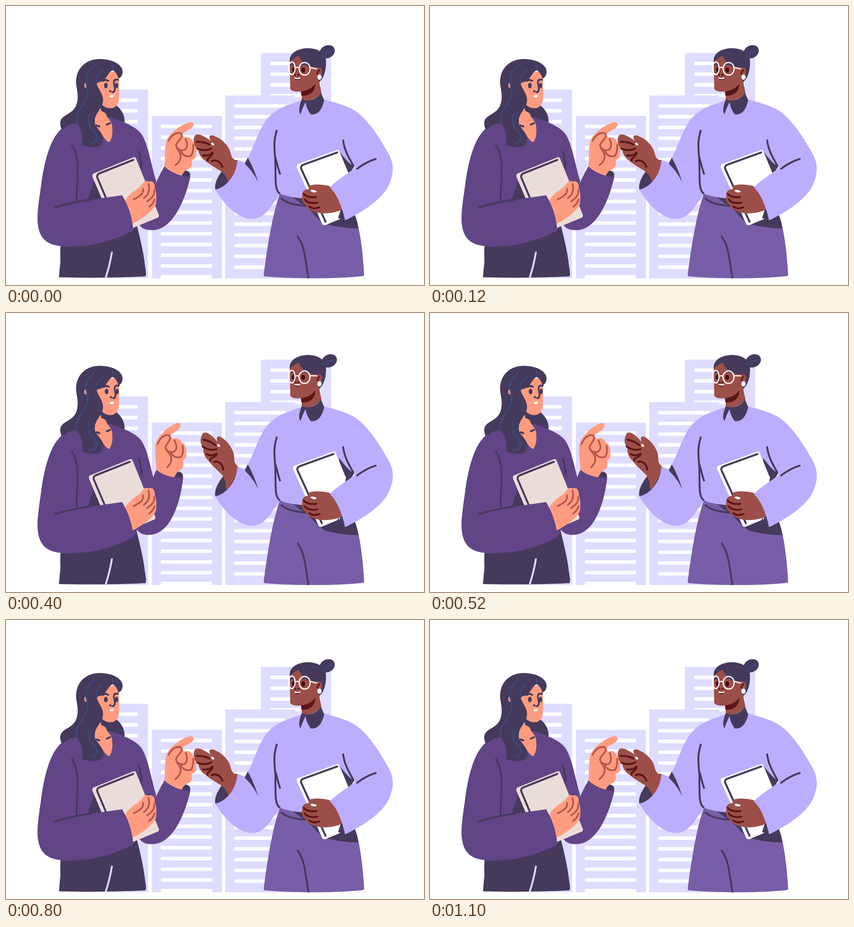
Write an HTML page with a canvas that moves like this. It is 900 px wide and 600 px high and loops after 1.3 s.

```html
<!DOCTYPE html>
<html lang="en">
<head>
<meta charset="utf-8">
<title>Conversation</title>
<style>
html, body { margin: 0; width: 100%; height: 100%; overflow: hidden; background: #fff; }
canvas { display: block; width: 900px; height: 600px; }
</style>
</head>
<body>
<canvas id="stage" width="900" height="600"></canvas>
<script>
const ctx = document.getElementById('stage').getContext('2d');
const LOOP = 1300, STEP = 200;
const DARK = '#453a5c', BLUE = '#3f4673', PALE = '#dedcff', WHITE = '#fff';
const PLUM = '#614587', PEACH = '#ff9c80', RUST = '#b5534a', PAPER = '#eaddd9';
const LILAC = '#bcadff', SKIRT = '#785ea8', BROWN = '#9b4f48', MAROON = '#5c1515';
const EYE = '#3f0c0c';

// Offsets and angles for the three poses
const POSES = [
  { lift: 0, arm: 0, hand: 0, padL: [0, 0], padR: [0, 0], face: [0, 0], specs: [0, 0], bun: [0, 0] },
  { lift: -.6, arm: -3.5, hand: 5.8, padL: [-3, -4.4], padR: [-2.5, -3.4], face: [.8, -1], specs: [0, 1.9], bun: [2, 2] },
  { lift: -.6, arm: -6.4, hand: 12.5, padL: [-7.5, -10.4], padR: [-8, -11.2], face: [1.6, -1.6], specs: [-.3, 3.6], bun: [4.6, 5] }
];

const cache = {};
const path = d => cache[d] || (cache[d] = new Path2D(d));

function fill(color, d) {
  ctx.fillStyle = color;
  ctx.fill(path(d));
}

function line(color, width, d) {
  ctx.strokeStyle = color;
  ctx.lineWidth = width;
  ctx.stroke(path(d));
}

function oval(color, x, y, rx, ry, turn = 0, stroke = 0) {
  ctx.beginPath();
  ctx.ellipse(x, y, rx, ry, turn, 0, Math.PI * 2);
  if (stroke) {
    ctx.strokeStyle = color;
    ctx.lineWidth = stroke;
    ctx.stroke();
  } else {
    ctx.fillStyle = color;
    ctx.fill();
  }
}

function shifted([x, y], draw) {
  ctx.save();
  ctx.translate(x, y);
  draw();
  ctx.restore();
}

function turned(deg, x, y, draw) {
  ctx.save();
  ctx.translate(x, y);
  ctx.rotate(deg * Math.PI / 180);
  ctx.translate(-x, -y);
  draw();
  ctx.restore();
}

function tower(x, y, right, inset) {
  ctx.fillStyle = PALE;
  ctx.fillRect(x, y, right - x, 585.5 - y);
  ctx.fillStyle = WHITE;
  for (let row = y + 18.7; row < 580; row += 23.1)
    ctx.fillRect(x + inset, row, right - x - inset * 2 - 2.2, 7.6);
}

function city() {
  tower(549, 101, 700, 20);
  tower(472, 192.5, 623, 19.5);
  tower(314, 236.3, 465, 19.5);
  tower(155, 180, 306, 20);
}

function raisedArm() {
  fill(DARK, 'M341 346C358 340 378 352 388 354C394 355 399 360 396 368L370 372Z');
  fill(PEACH, `M341 352C343 335 341 308 345 291C352 273 376 255 396 250C405 248 406 257 401 261
    C393 268 384 270 379 276L384 283C393 279 400 285 402 292C411 296 411 308 409 315
    C411 323 407 330 400 331C402 341 399 349 390 352C384 355 380 360 376 370Z`);
  line(RUST, 3.6, 'M350 290C356 277 368 270 377 274C383 283 369 290 366 299C367 309 376 312 376 323C376 332 371 337 365 342');
  line(RUST, 3.6, 'M387 286C391 297 391 307 383 310C378 311 372 309 369 306M377 311C379 320 387 325 397 323M403 299C404 310 401 320 397 323');
  fill(PLUM, `M341 345C332 360 328 370 323 380C310 402 290 440 284 464C289 478 300 482 315 482
    C361 482 387 412 397 367C378 368 355 358 341 345Z`);
}

function leftHead(pose) {
  fill(PEACH, 'M188 145L243 140C243 165 244 185 243 200C243 213 234 220 225 220C215 220 208 215 200 205Z');
  fill(DARK, `M151 168C149 131 175 114 202 114C232 114 253 128 251 143C250 151 246 155 242 156
    C240 148 236 142 230 138C220 142 218 154 209 161C203 164 198 164 195 166
    C197 177 209 188 209 202C209 214 202 222 196 231C189 243 190 254 196 263
    C204 271 215 283 207 297C196 308 174 303 163 298C168 282 162 264 152 252
    C140 254 129 260 120 266C106 230 143 240 152 211C157 195 153 183 151 168Z`);
  oval(PEACH, 172, 170, 3.6, 6);
  fill(DARK, 'M174 163L180 163L180 182L174 178C176 173 176 168 174 163Z');
  line(BLUE, 4.2, 'M189 130C174 141 169 154 174 169C180 190 172 203 163 216C155 227 150 237 152 249');
  line(BLUE, 4.2, 'M208 139C197 147 191 157 195 165M230 128L231 137M178 235C175 252 181 262 190 270C200 281 198 292 181 296');
  shifted(pose.face, () => {
    line(DARK, 4, 'M209 161C213 158 217 159 220 161M233 160C236 158 239 158 241 158.5');
    oval(DARK, 215, 171, 4, 6);
    oval(DARK, 238, 171, 3.5, 6);
    line(DARK, 3.6, 'M233 161C230 168 236 173 234 181C233 185 231 186 229 185');
    oval(DARK, 224.5, 183.5, 2.6, 2.2);
  });
  oval(WHITE, 228, 193.8, 4.8, 2.6, -.15);
}

function leftWoman(pose) {
  fill(DARK, 'M236 212C250 224 257 236 255 254L205 250L205 210Z');
  fill(DARK, 'M118 514C115 530 119 546 116 560L114 583.5C180 585 250 584 300 581.5C303 578 301 570 299 556C296 528 288 497 281 468L200 475Z');
  line(PALE, 4, 'M228 530C225 548 220 568 215 583');
  turned(pose.arm, 272, 498, raisedArm);
  fill(PLUM, `M120 264C94 285 81 340 75 390C69 430 66 455 69 472C73 502 91 516 127 517
    C180 519 235 505 274 482L284 464L318 420L323 375C313 345 306 292 289 272
    C278 259 248 246 224 239L152 250Z`);
  fill(PEACH, 'M207 218L215 229C216 244 229 243 229 264C230 279 226 289 222 293C210 288 204 268 190 254L194 232Z');
  fill(DARK, 'M203 214L222 220C217 222 216 226 216 233C213 229 209 227 205 226Z');
  line(DARK, 4, 'M195 257L201 259M217 255L224 252');
  leftHead(pose);
  line(DARK, 4, 'M142 299C161 327 152 370 152 418M286 313C290 325 291 333 291 348');
  fill(DARK, 'M190 374L176 417L215 414Z');
  shifted(pose.padL, () => {
    fill(PAPER, 'M189 360L274 325.5Q278 324 280 328L329 449Q330 453 327 455L243 490Q239 491 237 487L186 367Q185 362 189 360Z');
    line(DARK, 4.2, 'M274 331L201 360Q194 363 197 370L220 424');
  });
  fill(PEACH, `M256 421C264 401 286 395 296 380C299 375 304 376 307 378C317 373 322 384 320 392
    C325 399 324 416 323 425C319 440 290 460 271 469Z`);
  line(RUST, 3.6, 'M275 416C287 409 297 405 295 393M297 413C308 405 310 395 307 383');
  line(RUST, 3.6, 'M319 396C321 406 315 412 304 420M320 416C318 424 314 428 308 432');
  fill(PLUM, 'M106 433C150 421 200 414 250 407C262 427 272 452 274 482C235 503 180 517 127 517L90 470Z');
  line(DARK, 4, 'M106 433C140 422 162 420 184 416');
}

function openHand() {
  fill(BROWN, `M405 283C406 275 414 275 421 278C429 282 436 285 442 292C436 283 437 278 444 278
    C462 283 481 300 484 318C486 327 490 330 499 334L486 385L481 384C477 372 472 361 464 356
    C453 349 441 343 431 334C421 328 415 319 414 309C405 303 403 293 405 283Z`);
  oval(WHITE, 445, 297, 3.8, 2.4, .7);
  line(MAROON, 4, 'M410 292C420 292 430 293 438 298M412 307C422 311 433 311 442 306M424 321C430 323 440 321 444 315');
  line(MAROON, 4, 'M434 333C433 325 444 325 445 316M443 334C451 329 462 334 466 346');
}

function glasses() {
  oval(WHITE, 643, 135, 11.8, 13.6, 0, 2.5);
  oval(WHITE, 615.5, 134, 7, 13.6, 0, 2.5);
  line(WHITE, 2.5, 'M622.5 133Q627 131 631 133');
}

function rightHead(pose) {
  fill(BROWN, 'M636 170L637 201C650 208 672 198 679 186L672 150Z');
  fill(MAROON, 'M635 182C650 183 661 175 666 166C666 184 655 194 636 193Z');
  shifted(pose.bun, () => {
    oval(DARK, 691.5, 98.5, 17, 13.6, -.45);
    line(BLUE, 4, 'M684 108C687 100 695 96 703 98');
  });
  fill(BROWN, 'M611 118L630 104L668 122L678 146C671 166 656 180 640 183C630 185 615 185 612 178Z');
  fill(DARK, `M611 121C608 99 634 89 655 91C671 92 684 100 688 111C691 129 687 149 679 159
    L673 164L673 132C658 133 640 129 630 107C621 111 614 117 611 121Z`);
  line(BLUE, 4, 'M682 110L684 108');
  oval(BROWN, 674.5, 142, 6, 9.5, .15);
  fill(BROWN, 'M661 133L670 135L676 149L666 166L658 158Z');
  line(MAROON, 3, 'M670 146C671 141 673 139 675 138');
  oval(WHITE, 675, 153, 4.6, 5.7);
  const [dx, dy] = pose.specs;
  shifted([dx, dy * .4], () => {
    line(DARK, 4, 'M635 126C640 123 646 124 651 128M613 126L619 125');
    oval(EYE, 640, 137.3, 4, 5.5);
    oval(EYE, 619, 137, 3.3, 5.5);
    line(MAROON, 3, 'M623 132C623 140 619 145 623 149M628 148L631 148');
  });
  shifted([0, -dy * .2], () => {
    fill(EYE, 'M621 154L634 154C634 160 622 162 621 154Z');
    line(WHITE, 3, 'M622.5 155Q628 157 632.5 155');
  });
  shifted(pose.specs, glasses);
  ctx.strokeStyle = WHITE;
  ctx.lineWidth = 2.5;
  ctx.beginPath();
  ctx.moveTo(655 + dx, 132 + dy);
  ctx.lineTo(669, 135.6);
  ctx.stroke();
}

function rightWoman(pose) {
  fill(SKIRT, `M590 403C576 440 565 500 555 577Q554 581 558 581.5C620 587 710 587 768 581Q772 580 771 576
    C769 540 765 505 759 476L700 400Z`);
  line(DARK, 4, 'M628 496C644 517 645 550 651 584');
  fill(DARK, `M618 411L650 405L740 420C750 445 757 462 759 478C735 479 705 474 686 468
    C668 456 657 440 643 428C634 425 626 418 618 411Z`);
  line(DARK, 4, 'M593 414C605 425 625 428 648 430');
  fill(DARK, 'M498 331C481 329 444 374 451 395L478 387L498 350Z');
  turned(pose.hand, 505, 350, openHand);
  fill(LILAC, `M498 331C508 333 512 339 516 336C530 312 539 281 552 258C565 234 585 221 606 214
    L638 202L684 201C711 208 741 216 758 230C786 252 809 292 824 318C835 338 835 357 828 376
    C818 408 780 435 731 461L690 412L645 414C625 413 606 410 590 404C570 430 558 458 530 458
    C500 458 470 428 451 395C478 388 497 360 498 331Z`);
  fill(DARK, 'M520.5 326C530 342 537 360 543.5 380C535 362 525 350 514 339Z');
  line(DARK, 4, 'M583 268C573 298 581 320 580 344C581 370 578 395 589 403M580 326C584 340 586 350 590 361');
  rightHead(pose);
  fill(DARK, `M637 200C650 208 671 200 678 186L685 203C680 227 668 235 656 233C651 226 647 219 645 207
    C640 216 637 224 634 233C628 224 633 211 637 200Z`);
  fill(DARK, 'M717 312C728 326 737 338 750 346L736 371L720 345Z');
  fill(WHITE, 'M750 345L740 360L746 355L752 350Z');
  line(DARK, 4, 'M726 289C728 309 738 326 748 344');
  shifted(pose.padR, () => {
    fill(WHITE, 'M629 340L712 310Q716 309 718 313L740 366L722 457L687 471.5Q683 472 681 469L626 347Q625 342 629 340Z');
    line(DARK, 4.2, 'M713 315L641 341Q633 344 636 351L688 464');
  });
  fill(DARK, 'M721 437L731 432L735 463L715 456Z');
  fill(BROWN, `M651 389C653 382 684 383 698 388C712 402 719 422 724 438C706 446 686 447 673 445
    C660 442 648 437 645 428C638 424 636 415 638 408C636 399 644 393 652 394Z`);
  fill(WHITE, 'M655 397C660 394 667 396 669 399C667 402 660 402 655 397Z');
  line(MAROON, 4, 'M641 404C647 411 656 412 668 411M643 416C649 424 658 425 670 423M653 431C659 436 667 436 675 433');
  fill(LILAC, 'M754 346C735 362 712 374 697 390C713 404 724 432 730 461C780 437 818 408 828 376L800 325Z');
  line(DARK, 4, 'M756 350C768 341 782 333 796 329');
}

function render(ms) {
  const step = Math.min(4, Math.floor(ms % LOOP / STEP));
  const pose = POSES[2 - Math.abs(2 - step)];
  ctx.fillStyle = WHITE;
  ctx.fillRect(0, 0, 900, 600);
  ctx.lineCap = ctx.lineJoin = 'round';
  shifted([0, pose.lift], () => {
    city();
    leftWoman(pose);
    rightWoman(pose);
  });
}

const start = performance.now();
function tick() {
  render(performance.now() - start);
  requestAnimationFrame(tick);
}
tick();
</script>
</body>
</html>
```
